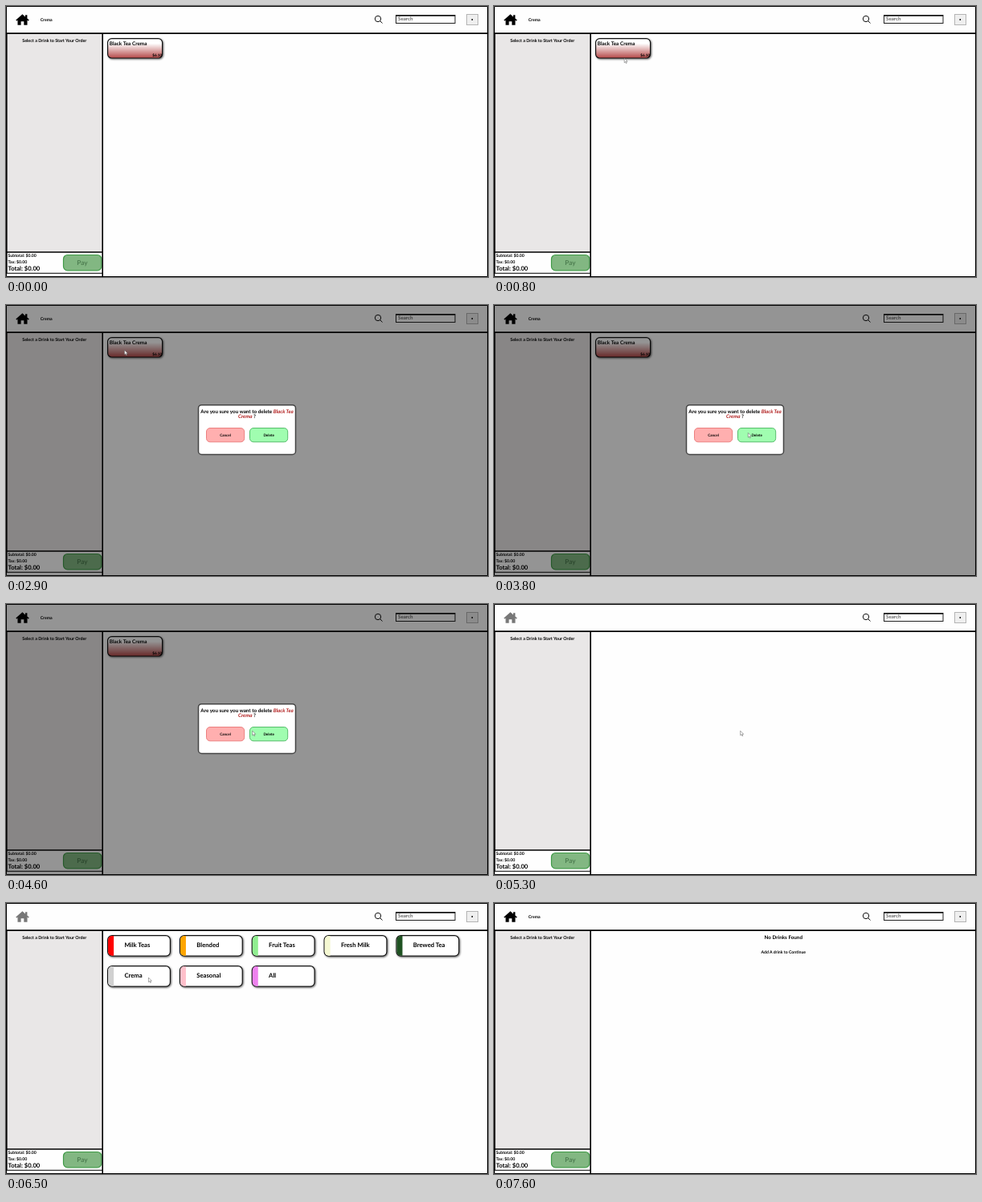
These frames come from a looping animation (600x338 px, 8800 ms). An HTML page:

```html
<!DOCTYPE html>
<html lang="en">
<head>
<meta charset="utf-8">
<title>Drink order screen</title>
<style>
  html, body { margin: 0; width: 100%; height: 100%; overflow: hidden; background: #fff; }
  svg { display: block; width: 100vw; height: 100vh; }
  text { font-family: Lato, "Open Sans", sans-serif; font-weight: 700; text-rendering: geometricPrecision; }
  .mid { text-anchor: middle; }
  .card { stroke: #111; stroke-width: 1.2; filter: drop-shadow(1.5px 1.5px 1px #0009); }
</style>
</head>
<body>
<svg viewBox="0 0 600 338">
  <defs>
    <linearGradient id="tea" x2="0" y2="1">
      <stop offset=".25" stop-color="#fff"/>
      <stop offset="1" stop-color="#b54848"/>
    </linearGradient>
  </defs>

  <!-- header -->
  <rect width="600" height="338" fill="#fefefe"/>
  <path id="home" d="M12.3 17.6 20.4 10.2 24 13.4V11.2h2.4v4.4l2.4 2-1 1.1-1.3-1.1V23.8H22.3V19.2H18.6V23.8H14.5V17.6l-1.2 1.1z"/>
  <text id="crumb" x="42.7" y="18.5" font-size="5.2">Crema</text>
  <g fill="none" stroke="#111" stroke-width="1">
    <circle cx="463" cy="16" r="3.7"/>
    <path d="M465.7 18.7 468.5 21.5"/>
  </g>
  <rect x="485.5" y="11.5" width="73.5" height="10" fill="#fff" stroke="#222"/>
  <path d="M485 12H559" stroke="#111" stroke-width="1.6"/>
  <text x="488" y="18.4" font-size="6.2" fill="#666">Search</text>
  <rect x="573.5" y="10.5" width="14" height="13" fill="#efefef" stroke="#b4b4b4"/>
  <circle cx="580.3" cy="17" r=".9"/>

  <!-- order panel -->
  <rect x="1" y="35" width="119" height="272" fill="#e9e7e7"/>
  <text class="mid" x="60.3" y="45" font-size="5.4">Select a Drink to Start Your Order</text>
  <g font-size="5.2">
    <text x="2.5" y="313">Subtotal: $0.00</text>
    <text x="2.5" y="320.6">Tax: $0.00</text>
    <text x="2.5" y="329.6" font-size="7.6">Total: $0.00</text>
  </g>
  <rect x="71.5" y="310.5" width="47.3" height="19.3" rx="5" fill="#82b782" stroke="#3f9a46" stroke-width="1.2"/>
  <text class="mid" x="95" y="322.7" font-size="8.2" fill="#4f7f52">Pay</text>
  <g fill="none" stroke="#000">
    <path d="M.5 .5H599.5V337.5H.5zM0 333.3H120"/>
    <path stroke-width="1.6" d="M0 34.1H600M.8 34V333M120.2 34V338M0 307H120"/>
  </g>

  <g id="drink">
    <rect class="card" x="126.6" y="40.6" width="68" height="24.4" rx="5" fill="url(#tea)"/>
    <text x="128.8" y="48.6" font-size="6.4">Black Tea Crema</text>
    <text x="182.2" y="62.6" font-size="4.7">$6.10</text>
  </g>

  <g id="menu" font-size="7.7"></g>

  <g id="empty" class="mid">
    <text x="360.3" y="45" font-size="6.3">No Drinks Found</text>
    <text x="360.3" y="63" font-size="5.2">Add A drink to Continue</text>
  </g>

  <g id="dialog" class="mid">
    <rect width="600" height="338" fill-opacity=".42"/>
    <rect x="239.5" y="124.7" width="121" height="61.8" rx="4" fill="#fff" stroke="#444" stroke-width="1.5"/>
    <g font-size="6.3">
      <text x="300" y="134.6">Are you sure you want to delete <tspan fill="#b01c1c" font-style="italic">Black Tea</tspan></text>
      <text x="300" y="140.7"><tspan fill="#b01c1c" font-style="italic">Crema</tspan> ?</text>
    </g>
    <rect x="249.5" y="153.5" width="47.2" height="17.3" rx="4.5" fill="#ffafaf" stroke="#ec7f7f"/>
    <rect x="303.5" y="153.5" width="47.2" height="17.3" rx="4.5" fill="#a0fdb0" stroke="#55bd6a"/>
    <g font-size="4.6">
      <text x="273" y="163.7">Cancel</text>
      <text x="327.2" y="163.7">Delete</text>
    </g>
  </g>

  <path id="cursor" d="M0 0V5.6L1.3 4.5 2.2 6.5 3.1 6.1 2.2 4.1H4z" fill="#fff" stroke="#555" stroke-width=".5"/>
</svg>
<script>
const $ = id => document.getElementById(id);
const LOOP = 8800, STEP = 100;

const categories = [
  ['Milk Teas', 'red'], ['Blended', 'orange'], ['Fruit Teas', 'lightgreen'],
  ['Fresh Milk', '#f5f8d2'], ['Brewed Tea', '#1f5222'],
  ['Crema', '#d0d0d0'], ['Seasonal', 'pink'], ['All', 'violet']
];
$('menu').innerHTML = categories.map(([name, color], i) => {
  const x = 126.6 + i % 5 * 89.85, y = 40.6 + Math.floor(i / 5) * 38;
  return `<rect class="card" x="${x}" y="${y}" width="77.8" height="25.6" rx="5.5" fill="#fff"/>
    <path d="M${x + 7.5} ${y + .5}h-2a5 5 0 0 0-5 5v14.6a5 5 0 0 0 5 5h2z" fill="${color}"/>
    <text x="${x + 20.8}" y="${y + 14.8}">${name}</text>`;
}).join('');

// Pointer stops: time, x, y
const stops = [
  [100, 434, 178], [900, 150, 60], [1600, 147.5, 56.3],
  [3300, 147.5, 56.3], [4000, 358, 185], [4200, 342, 165],
  [4400, 283, 158.5], [4600, 306.7, 158.2],
  [5700, 306.7, 158.2], [6500, 177.4, 93],
  [7300, 177.4, 93], [7500, 434, 173.5]
];

function pointerAt(t) {
  const i = stops.findIndex(s => s[0] >= t);
  if (i < 1) return stops[i < 0 ? stops.length - 1 : 0].slice(1);
  const [t0, x0, y0] = stops[i - 1], [t1, x1, y1] = stops[i];
  const p = (t - t0) / (t1 - t0), e = p * p * (3 - 2 * p);
  return [x0 + (x1 - x0) * e, y0 + (y1 - y0) * e];
}

const show = (id, on) => $(id).style.display = on ? '' : 'none';

function draw(now) {
  const t = Math.floor(now % LOOP / STEP) * STEP;
  const onHome = t >= 5300 && t < 6600;
  $('home').setAttribute('fill', onHome ? '#777' : '#000');
  show('crumb', !onHome);
  show('drink', t < 5300);
  show('dialog', t >= 2900 && t < 5300);
  show('menu', t >= 5600 && t < 6600);
  show('empty', t >= 6600);
  show('cursor', t >= 100 && t < 7600);
  $('cursor').setAttribute('transform', `translate(${pointerAt(t)})`);
}

const start = performance.now();
function tick() {
  draw(performance.now() - start);
  requestAnimationFrame(tick);
}
tick();
</script>
</body>
</html>
```
